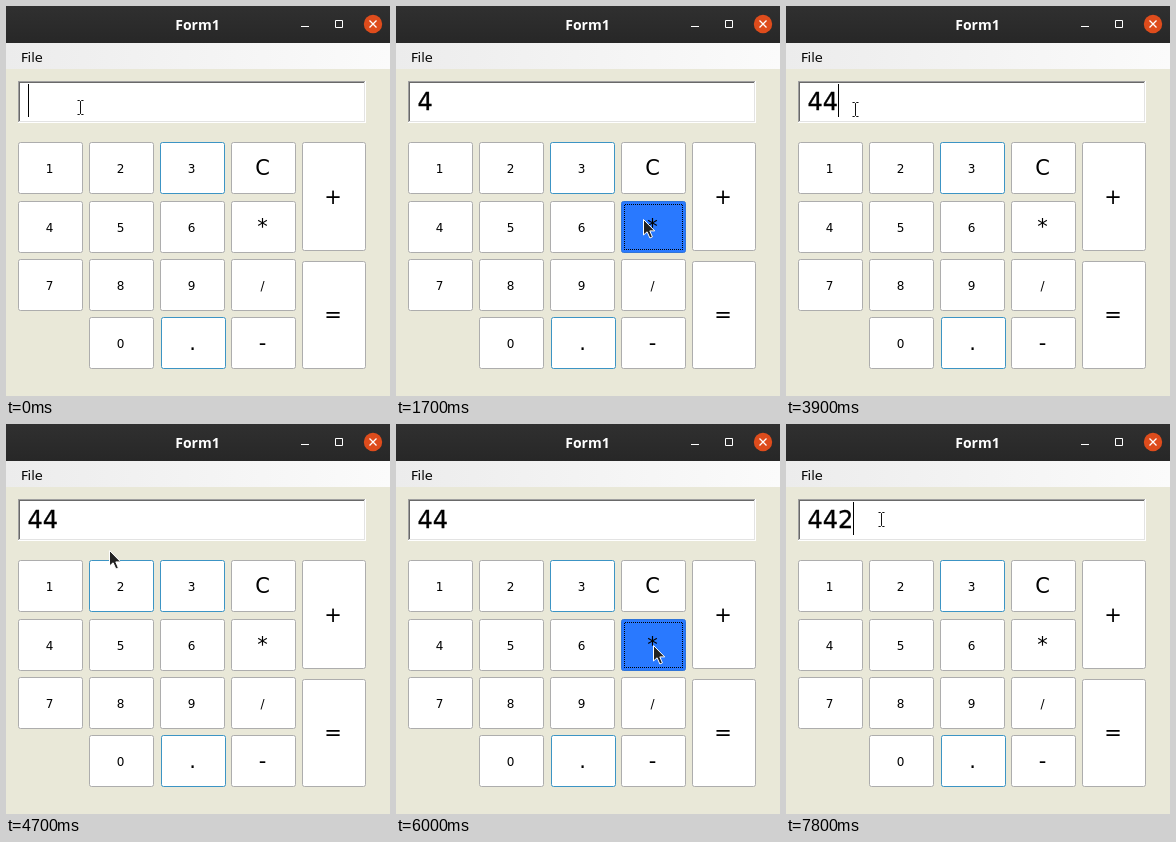
Animation, 384 px wide and 390 px high, one loop 8 s. Source, as an HTML page:

```html
<!DOCTYPE html>
<html lang="en">
<head>
<meta charset="utf-8">
<title>Calculator form</title>
<style>
  html, body { margin: 0; width: 100%; height: 100%; overflow: hidden; background: #e9e8d8; }
  svg { display: block; width: 384px; height: 390px; }
  text { font-family: "DejaVu Sans", sans-serif; fill: #000; }
  .title { font: bold 14px "Open Sans", sans-serif; fill: #fff; text-anchor: middle; }
  .key rect { fill: #fff; stroke: #adadad; }
  .key text { text-anchor: middle; }
  .key.hot rect { stroke: #3c94c4; }
  .key.down rect { fill: #2979ff; stroke: #2f74d8; }
  .ring { display: none; fill: none; stroke: #000; stroke-dasharray: 1 1; }
  .ringed .ring { display: inline; }
  .crisp { shape-rendering: crispEdges; }
</style>
</head>
<body>
<svg viewBox="0 0 384 390">
  <defs>
    <linearGradient id="bar" x2="0" y2="1">
      <stop stop-color="#303030"/><stop offset="1" stop-color="#272727"/>
    </linearGradient>
    <linearGradient id="menu">
      <stop stop-color="#ececec"/><stop offset="1" stop-color="#fbfbfb"/>
    </linearGradient>
    <path id="beamShape" d="M-3 -7H-1L0 -6L1 -7H3M0 -6V6M-3 7H-1L0 6L1 7H3"/>
  </defs>
  <rect width="384" height="390" fill="#e9e8d8"/>
  <rect width="384" height="37" fill="url(#bar)"/>
  <text class="title" x="191.5" y="24">Form1</text>
  <g fill="none" stroke="#fff">
    <path d="M295 20.5h8M329.5 14.5h7v7h-7z"/>
    <circle cx="367" cy="18" r="9.2" fill="#de4c1c" stroke="none"/>
    <path d="M363.5 14.5l7 7m0-7l-7 7" stroke-width="1.3"/>
  </g>
  <rect y="37" width="384" height="26" fill="url(#menu)"/>
  <text x="15" y="56" font-size="13">File</text>

  <g class="crisp" fill="none">
    <rect x="12" y="75" width="348" height="42" fill="#fff"/>
    <path d="M12.5 116V75.5H359" stroke="#a0a0a0"/>
    <path d="M13.5 115V76.5H358" stroke="#696969"/>
    <path d="M13 115.5H358.5V76" stroke="#e3e3e3"/>
  </g>
  <text id="entry" x="21.5" y="104" font-size="24" stroke="#000" stroke-width=".3"></text>
  <rect id="caret" class="crisp" y="78" width="1" height="33"/>
  <g id="keys"></g>

  <path id="arrow" d="M0 0V15.5L3.6 12.3L6.4 18.5L8.9 17.4L6.3 11.4H11.2Z" fill="#222" stroke="#fff" stroke-linejoin="round"/>
  <g id="beam" fill="none">
    <use href="#beamShape" stroke="#fff" stroke-width="3"/>
    <use href="#beamShape" stroke="#111"/>
  </g>
</svg>
<script>
const LOOP = 8000, STEP = 100, BLINK = 500, PRESS = 200;
const $ = id => document.getElementById(id);
const keys = [];

// Checkerboard dots along the four sides of a focus rectangle
function ringPath(x, y, w, h) {
  return `M${x + 1} ${y + .5}H${x + w}M${x} ${y + h - .5}H${x + w}` +
    `M${x + .5} ${y + 1}V${y + h}M${x + w - .5} ${y + 1}V${y + h}`;
}

function addKey(label, x, y, w = 65, h = 52) {
  const small = /[\d/]/.test(label);
  const g = document.createElementNS("http://www.w3.org/2000/svg", "g");
  g.innerHTML =
    `<rect x="${x + .5}" y="${y + .5}" width="${w - 1}" height="${h - 1}" rx="2"/>` +
    `<path class="ring crisp" d="${ringPath(x + 3, y + 3, w - 6, h - 6)}"/>` +
    `<text x="${x + w / 2 - 1}" y="${y + h / 2 + (small ? 5 : 7)}" font-size="${small ? 12 : 21}">${label}</text>`;
  $("keys").append(g);
  keys.push({ g, label, x, y, w, h });
}

["123C", "456*", "789/", " 0.-"].forEach((row, r) => [...row].forEach((label, c) => {
  if (label !== " ") addKey(label, 12 + 71 * c + (label === "."), Math.round(136.4 + 58.3 * r));
}));
addKey("+", 296, 136, 64, 109);
addKey("=", 296, 255, 64, 108);

const smooth = k => k * k * (3 - 2 * k);
const steady = k => k ** 1.12;
const rushed = k => 1 - (1 - k) ** 4;

const home = { x: 74, y: 101 };
const moves = [
  { from: 1000, to: 1500, x: 247, y: 213, ease: smooth },
  { from: 2200, to: 2600, x: 69, y: 103, ease: smooth },
  { from: 4500, to: 5400, x: 252, y: 229, ease: steady },
  { from: 5400, to: 5500, x: 268, y: 244, ease: steady },
  { from: 5500, to: 5700, x: 257, y: 221, ease: smooth },
  { from: 6500, to: 6800, x: 95, y: 95, ease: rushed }
];

const edits = [{ at: 0, text: "" }, { at: 500, text: "4" }, { at: 3900, text: "44" }, { at: 7800, text: "442" }];
const blinkStarts = [-200, 500, 3900, 7000, 7800];
const starFocus = [{ from: 1700, to: 3900 }, { from: 6000, to: 7000 }];

const field = { x: 12, y: 75, w: 348, h: 42 };
const inside = (p, r) => p.x >= r.x && p.x < r.x + r.w && p.y >= r.y && p.y < r.y + r.h;

function pointerAt(t) {
  let { x, y } = home;
  for (const m of moves) {
    if (t <= m.from) break;
    const k = m.ease(Math.min(1, (t - m.from) / (m.to - m.from)));
    x += (m.x - x) * k;
    y += (m.y - y) * k;
  }
  return { x: Math.round(x), y: Math.round(y) };
}

function place(id, { x, y }, visible) {
  $(id).setAttribute("transform", `translate(${x + .5} ${y + .5})`);
  $(id).style.display = visible ? "" : "none";
}

function draw(time) {
  const t = Math.floor(time / STEP) * STEP;
  const { text } = edits.findLast(e => t >= e.at);
  const focus = starFocus.find(f => t >= f.from && t < f.to);
  const sinceBlink = t - blinkStarts.findLast(s => t >= s);

  $("entry").textContent = text;
  $("caret").setAttribute("x", 22 + 15 * text.length);
  $("caret").style.display = !focus && sinceBlink % (2 * BLINK) < BLINK ? "" : "none";

  const pointer = pointerAt(t), overField = inside(pointer, field);
  place("arrow", pointer, !overField);
  place("beam", pointer, overField);

  // Hover runs one step ahead of the drawn pointer
  const ahead = pointerAt(t + STEP);
  for (const key of keys) {
    const ringed = key.label === "*" && !!focus;
    const { classList } = key.g;
    classList.add("key");
    classList.toggle("hot", ringed || "3.".includes(key.label) || inside(ahead, key));
    classList.toggle("ringed", ringed);
    classList.toggle("down", ringed && t < focus.from + PRESS);
  }
}

const start = performance.now();
function tick() {
  draw((performance.now() - start) % LOOP);
  requestAnimationFrame(tick);
}
tick();
</script>
</body>
</html>
```
